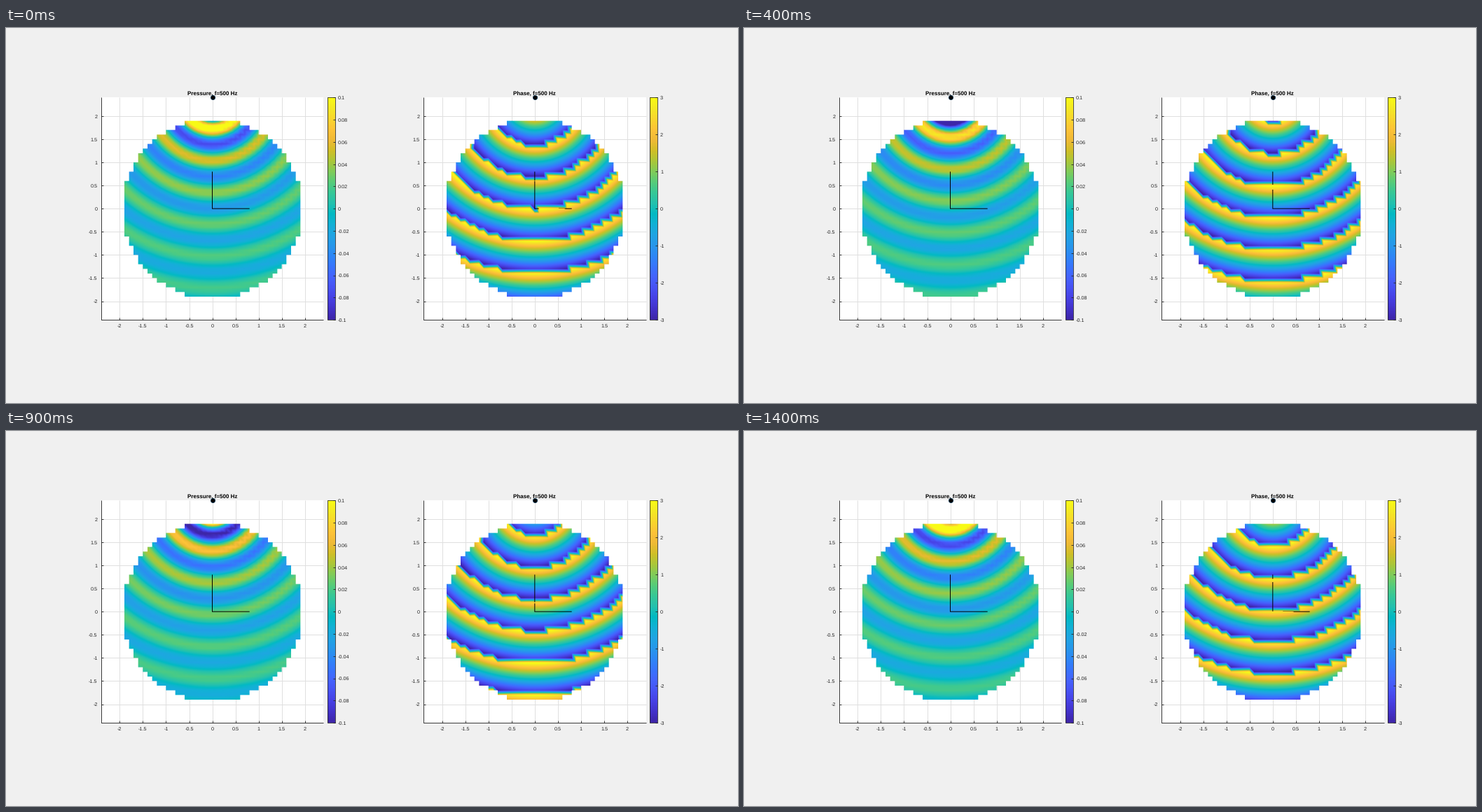
Write a matplotlib script that moves like this. It is 1045 px wide and 536 px high and loops after 1500 ms.

```python
import numpy as np
import matplotlib
import matplotlib.pyplot as plt
from matplotlib.animation import FuncAnimation
from matplotlib.colors import LinearSegmentedColormap
from matplotlib.patches import Rectangle

matplotlib.rcParams.update({"font.family": "Liberation Sans", "text.hinting": "none"})

WIDTH, HEIGHT, DPI = 1045, 536, 100
PX = 72 / DPI                      # one pixel in points
STEPS, INTERVAL = 15, 100
INK = "#262626"

SCALE, CENTER_Y, HALF = 66.15, 258.25, 2.4
TOP, BOTTOM = CENTER_Y - HALF * SCALE, CENTER_Y + HALF * SCALE

FREQ, SOUND_SPEED, SOURCE_Y = 500, 343, 2.4
WAVENUMBER = 2 * np.pi * FREQ / SOUND_SPEED
CELL, RADIUS = 0.1, 2.0
AXIS_LENGTH, AXIS_HEIGHT, AXIS_WIDTH = 0.8, 2.3, 0.9
SAMPLES = 3                        # samples per pixel side

CMAP = LinearSegmentedColormap.from_list("blue_yellow", [
    "#3e26a8", "#4332cb", "#4741e5", "#4852f4", "#4563fd", "#3875fe",
    "#2e87f7", "#2797eb", "#20a5e3", "#12b1d6", "#02bac3", "#24c1ae",
    "#37c897", "#57cc7a", "#81cc59", "#abc739", "#d1bf27", "#f0ba36",
    "#fec338", "#fad62d", "#f5e924", "#f9fb15"], N=256)

# Mesh nodes; rows run upwards
nodes = np.round(np.arange(-20, 21) * CELL, 10)
node_x, node_y = np.meshgrid(nodes, nodes)
distance = np.hypot(node_x, node_y - SOURCE_Y)
inside = node_x**2 + node_y**2 <= RADIUS**2 + 1e-9


def pressure(step):
    return np.cos(2 * np.pi * step / STEPS - WAVENUMBER * distance) / (4 * np.pi * distance)


def phase(step):
    return np.angle(np.exp(1j * (2 * np.pi * step / STEPS - WAVENUMBER * distance)))


def average_samples(rgba):
    """Reduce the samples to pixels, weighting colour by coverage."""
    rows, cols = rgba.shape[0] // SAMPLES, rgba.shape[1] // SAMPLES
    rgba[..., :3] *= rgba[..., 3:]
    pixels = rgba.reshape(rows, SAMPLES, cols, SAMPLES, 4).mean(axis=(1, 3))
    pixels[..., :3] /= np.maximum(pixels[..., 3:], 1e-6)
    return np.clip(pixels, 0, 1)


class Panel:
    def __init__(self, ax, center_x, title, field, limit, ticks):
        self.ax, self.cx, self.field, self.limit = ax, center_x, field, limit
        self.left, self.right = center_x - HALF * SCALE, center_x + HALF * SCALE
        self.draw_axes(title)
        self.draw_colorbar(ticks)
        self.prepare_pixels()
        ax.plot(center_x, TOP, "o", ms=6.2 * PX, mfc="black", mec="#06304f",
                mew=0.8 * PX, zorder=6, snap=False)

    def line(self, xs, ys, color=INK, width=0.9, z=4):
        self.ax.plot(xs, ys, color=color, lw=width * PX, zorder=z,
                     solid_capstyle="butt")

    def label(self, x, y, text, ha, size=7.25, **style):
        self.ax.text(x, y, text, ha=ha, va="baseline", fontsize=size * PX,
                     zorder=5, **{"color": INK, **style})

    def draw_axes(self, title):
        self.ax.add_patch(Rectangle((self.left, TOP), 2 * HALF * SCALE,
                                    2 * HALF * SCALE, fc="white", ec="none"))
        for value in np.arange(-2, 2.1, 0.5):
            x, y = self.cx + value * SCALE, CENTER_Y - value * SCALE
            self.line([x, x], [TOP, BOTTOM], "#dfdfdf", 1, 2)
            self.line([self.left, self.right], [y, y], "#dfdfdf", 1, 2)
            self.line([x, x], [BOTTOM, BOTTOM - 3.2])
            self.line([self.left, self.left + 3.2], [y, y])
            self.label(x, 428.3, f"{value:g}", "center")
            self.label(self.left - 5.2, y + 2.7, f"{value:g}", "right")
        self.line([self.left, self.left, self.right], [TOP, BOTTOM, BOTTOM])
        self.label(self.cx, 96.9, title, "center", 8, weight="bold", color="black")

    def draw_colorbar(self, ticks):
        x0, x1 = self.right + 5.7, self.right + 16.7
        self.ax.imshow(np.linspace(1, 0, 256)[:, None], cmap=CMAP, aspect="auto",
                       extent=(x0, x1, BOTTOM, TOP), zorder=3)
        self.ax.add_patch(Rectangle((x0, TOP), x1 - x0, BOTTOM - TOP, fc="none",
                                    ec=INK, lw=0.8 * PX, zorder=4))
        for value in ticks:
            y = CENTER_Y - value / self.limit * HALF * SCALE
            self.line([x1 - 3, x1], [y, y])
            self.label(x1 + 3.7, y + 2.7, f"{value:g}", "left")

    def prepare_pixels(self):
        x0, x1 = int(self.cx) - 128, int(self.cx) + 129
        y0, y1 = int(CENTER_Y) - 128, int(CENTER_Y) + 129
        offset = 0.5 / SAMPLES
        cols, rows = np.meshgrid(np.arange(x0, x1, 1 / SAMPLES) + offset,
                                 np.arange(y0, y1, 1 / SAMPLES) + offset)
        x, y = (cols - self.cx) / SCALE, (CENTER_Y - rows) / SCALE
        gx, gy = (x - nodes[0]) / CELL, (y - nodes[0]) / CELL
        self.i, self.j = gx.astype(int), gy.astype(int)
        self.u, self.v = gx - self.i, gy - self.j
        self.visible = np.all(self.corners(inside), axis=0)
        half = AXIS_WIDTH / 2 / SCALE
        self.cross = ((abs(x) <= half) & (y >= -half) & (y <= AXIS_LENGTH)
                      | (abs(y) <= half) & (x >= -half) & (x <= AXIS_LENGTH))
        self.image = self.ax.imshow(np.zeros((y1 - y0, x1 - x0, 4)), aspect="auto",
                                    extent=(x0, x1, y1, y0), zorder=3,
                                    interpolation="nearest")

    def corners(self, grid):
        i, j = self.i, self.j
        return grid[j, i], grid[j, i + 1], grid[j + 1, i], grid[j + 1, i + 1]

    def update(self, step):
        # Each cell is two flat triangles, split from top left to bottom right
        low_l, low_r, up_l, up_r = self.corners(self.field(step))
        u, v = self.u, self.v
        values = np.where(u + v <= 1,
                          low_l + u * (low_r - low_l) + v * (up_l - low_l),
                          up_r + (1 - u) * (up_l - up_r) + (1 - v) * (low_r - up_r))
        rgba = CMAP(np.clip((values / self.limit + 1) / 2, 0, 1))
        rgba[..., 3] = self.visible
        # The axis cross floats at a fixed height, so high crests cover it
        rgba[self.cross & (values < AXIS_HEIGHT)] = (0, 0, 0, 1)
        self.image.set_data(average_samples(rgba))
        return self.image


fig = plt.figure(figsize=(WIDTH / DPI, HEIGHT / DPI), dpi=DPI, facecolor="#f0f0f0")
stage = fig.add_axes([0, 0, 1, 1])
panels = [
    Panel(stage, 294.6, "Pressure, f=500 Hz", pressure, 0.1,
          np.arange(-5, 6) / 50),
    Panel(stage, 754.8, "Phase, f=500 Hz", phase, 3, range(-3, 4)),
]
stage.set_xlim(0, WIDTH)
stage.set_ylim(HEIGHT, 0)
stage.axis("off")


def draw(step):
    return [panel.update(step) for panel in panels]


animation = FuncAnimation(fig, draw, frames=STEPS, interval=INTERVAL,
                          repeat=True, repeat_delay=0, blit=False)
plt.show()
```
